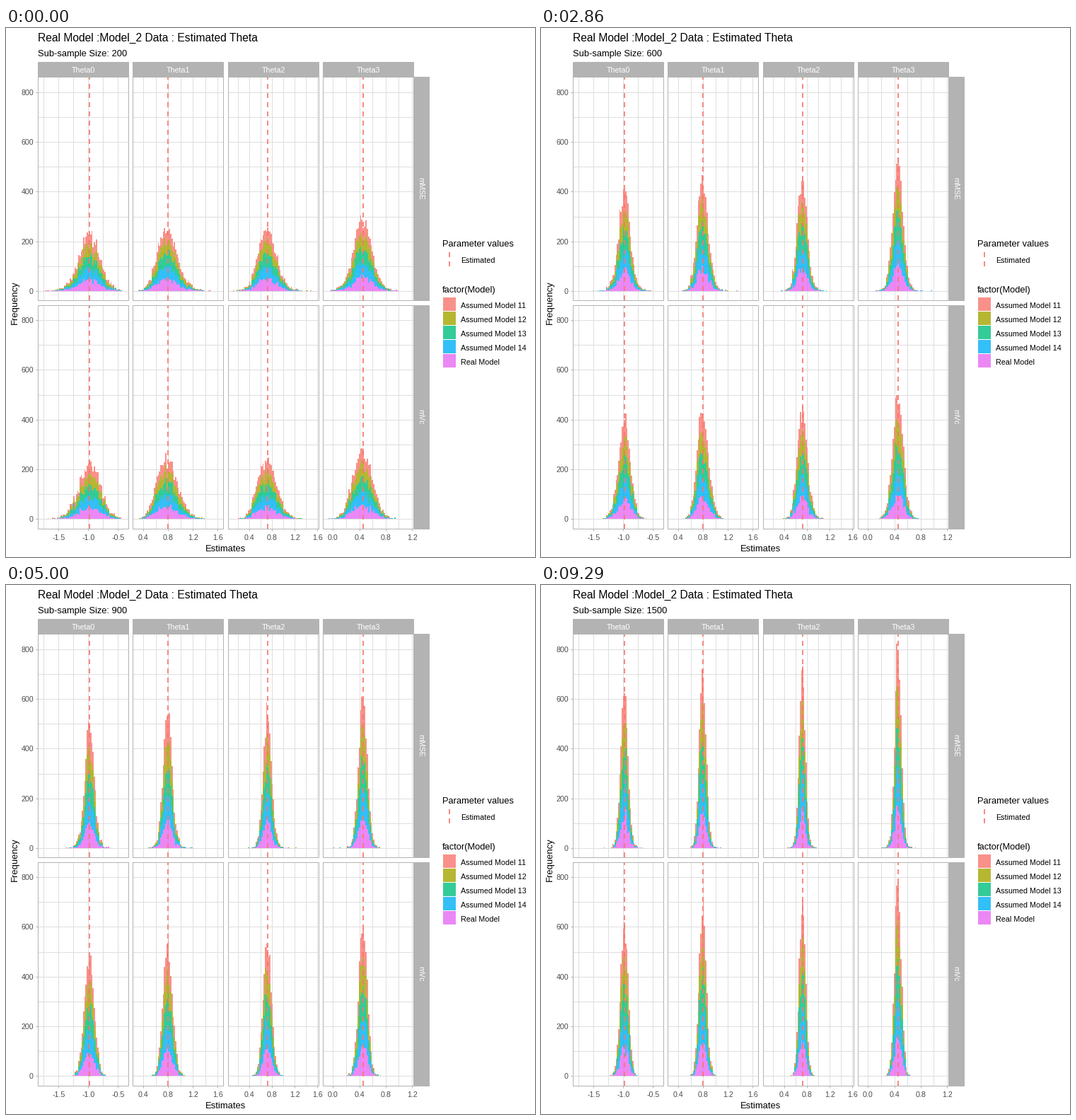
These frames come from a looping animation (748 px wide and 748 px high, 10000 ms). A matplotlib script:

```python
import numpy as np
import matplotlib.pyplot as plt
from matplotlib.animation import FuncAnimation
from matplotlib.patches import Rectangle

SIZE, DPI = 748, 100
PX = 72 / DPI
LOOP, STEP = 10000, 50
SIZES = range(200, 1501, 100)
SWITCH = [round(LOOP * k / len(SIZES), -1) for k in range(len(SIZES))]

plt.rcParams["font.family"] = "Liberation Sans"
GREY, GRID, TICK = "#B3B3B3", "#DEDEDE", "#4D4D4D"
RED = "#F8766D"
FILLS = {"Assumed Model 11": RED, "Assumed Model 12": "#A3A500",
         "Assumed Model 13": "#00BF7D", "Assumed Model 14": "#00B0F6",
         "Real Model": "#E76BF3"}
BIN, REPS = 0.02, 1000

# left edge, pixel of value 0, pixels per unit, tick values, tick format,
# estimate, spread at size 200, skew
COLS = [
    (45, 200.5, 84.0, (-1.5, -1.0, -0.5), 0.25, -0.985, 0.188, -0.02),
    (179.5, 159.5, 87.5, (0.4, 0.8, 1.2, 1.6), 0.2, 0.791, 0.170, 0.05),
    (314, 312.5, 80.0, (0.4, 0.8, 1.2, 1.6), 0.2, 0.715, 0.168, 0.03),
    (448.5, 462.5, 93.0, (0.0, 0.4, 0.8, 1.2), 0.2, 0.454, 0.149, 0.01),
]
# name, top edge, pixel of count 0, tail weight
ROWS = [("mMSE", 69, 371.8, 14), ("mVc", 392, 694.0, 40)]
WIDTH, HEIGHT, UNIT = 128, 316, 0.351

fig = plt.figure(figsize=(SIZE / DPI, SIZE / DPI), dpi=DPI, facecolor="white")
ax = fig.add_axes([0, 0, 1, 1])
ax.set_xlim(0, SIZE)
ax.set_ylim(SIZE, 0)
ax.axis("off")


def text(x, y, s, px, color="black", **kw):
    kw.setdefault("va", "baseline")
    return ax.text(x, y, s, fontsize=px * PX, color=color, **kw)


def line(xs, ys, color, px=1, z=0.5, **kw):
    ax.plot(xs, ys, color=color, lw=px * PX, zorder=z,
            solid_capstyle="butt", dash_capstyle="butt", **kw)


def box(x, y, w, h, z=1, **kw):
    ax.add_patch(Rectangle((x, y), w, h, zorder=z, **kw))


def dashed(x, bottom, top):
    w = 1.7
    line([x, x], [bottom, top], RED, w, 2, ls=(0, (7 / w, 6 / w)))


def draw_panel(col, row):
    left, zero, scale, ticks, half, est = col[:6]
    top, base = row[1:3]
    for v in range(0, 801, 100):
        y = base - v * UNIT
        line([left, left + WIDTH], [y, y], GRID)
    for i in range(-1, 2 * len(ticks) + 1):
        x = zero + scale * (ticks[0] + i * half)
        if left < x < left + WIDTH:
            line([x, x], [top, top + HEIGHT], GRID)
    dashed(zero + scale * est + 0.1, top + HEIGHT, top)
    box(left, top, WIDTH, HEIGHT, 3, fill=False, ec=GREY, lw=PX)


def bin_edges(col):
    left, zero, scale = col[:3]
    lo = round((left + 8 - zero) / scale / BIN)
    hi = round((left + WIDTH - 8 - zero) / scale / BIN)
    return (np.arange(lo, hi + 1) - 0.5) * BIN


def stack(col, row, n, rng):
    """Cumulative counts per bin, from the real model upwards."""
    est, spread, skew = col[5:]
    tail = row[3]
    sd = spread * (n / 200) ** -0.53
    shrink = np.sqrt(200 / n)
    z = rng.standard_t(tail, (len(FILLS), REPS)) * np.sqrt((tail - 2) / tail)
    z += skew * shrink * (z * z - 1)
    edges = bin_edges(col)
    counts = [np.histogram(est + sd * s, edges)[0] for s in z]
    return np.vstack([np.zeros(len(edges) - 1), np.cumsum(counts, axis=0)])


# titles and axes
text(45, 19, "Real Model :Model_2 Data : Estimated Theta", 15.6)
subtitle = text(45, 39.5, "", 12.9)
text(311, 740, "Estimates", 13, ha="center")
text(13, 388.5, "Frequency", 13, rotation=90, ha="center", va="center")

for i, col in enumerate(COLS):
    left, zero, scale, ticks = col[:4]
    box(left, 48, WIDTH, 21, fc=GREY, ec=GREY, lw=PX)
    text(left + WIDTH / 2, 63, f"Theta{i}", 10.6, "white", ha="center")
    for v in ticks:
        x = zero + scale * v
        line([x, x], [708, 711], GREY)
        text(x, 723.5, f"{v:.1f}", 10.6, TICK, ha="center")
    for row in ROWS:
        draw_panel(col, row)

for name, top, base, _ in ROWS:
    box(577, top, 21, HEIGHT, fc=GREY, ec=GREY, lw=PX)
    text(586.5, top + HEIGHT / 2, name, 10.6, "white", rotation=270,
         ha="center", va="center")
    for v in range(0, 801, 200):
        y = base - v * UNIT
        line([42, 45], [y, y], GREY)
        text(39, y + 4, str(v), 10.6, TICK, ha="right")

# legends
text(617, 309, "Parameter values", 12.9)
dashed(627.3, 337, 317)
text(643, 332, "Estimated", 10.7)
text(617, 374, "factor(Model)", 12.9)
for i, (name, color) in enumerate(FILLS.items()):
    box(618, 381 + 20 * i, 18, 19, fc=color, alpha=0.8, lw=0)
    text(643, 395.5 + 20 * i, name, 10.7)

# histograms
rng = np.random.default_rng(7)
panels = []
for row in ROWS:
    for col in COLS:
        data = [row[2] - UNIT * stack(col, row, n, rng) for n in SIZES]
        edges = col[1] + col[2] * bin_edges(col)
        bars = [ax.stairs(data[0][j + 1], edges, baseline=data[0][j],
                          fill=True, color=color, alpha=0.8, lw=0,
                          antialiased=False, zorder=1)
                for j, color in enumerate(reversed(FILLS.values()))]
        panels.append((bars, edges, data))


def update(i):
    end = (i + 1) * STEP
    k = sum(t < end for t in SWITCH) - 1
    subtitle.set_text(f"Sub-sample Size: {SIZES[k]}")
    for bars, edges, data in panels:
        for j, bar in enumerate(bars):
            bar.set_data(data[k][j + 1], edges, baseline=data[k][j])


anim = FuncAnimation(fig, update, frames=LOOP // STEP, interval=STEP,
                     init_func=lambda: update(0), repeat=True, repeat_delay=0)
plt.show()
```
